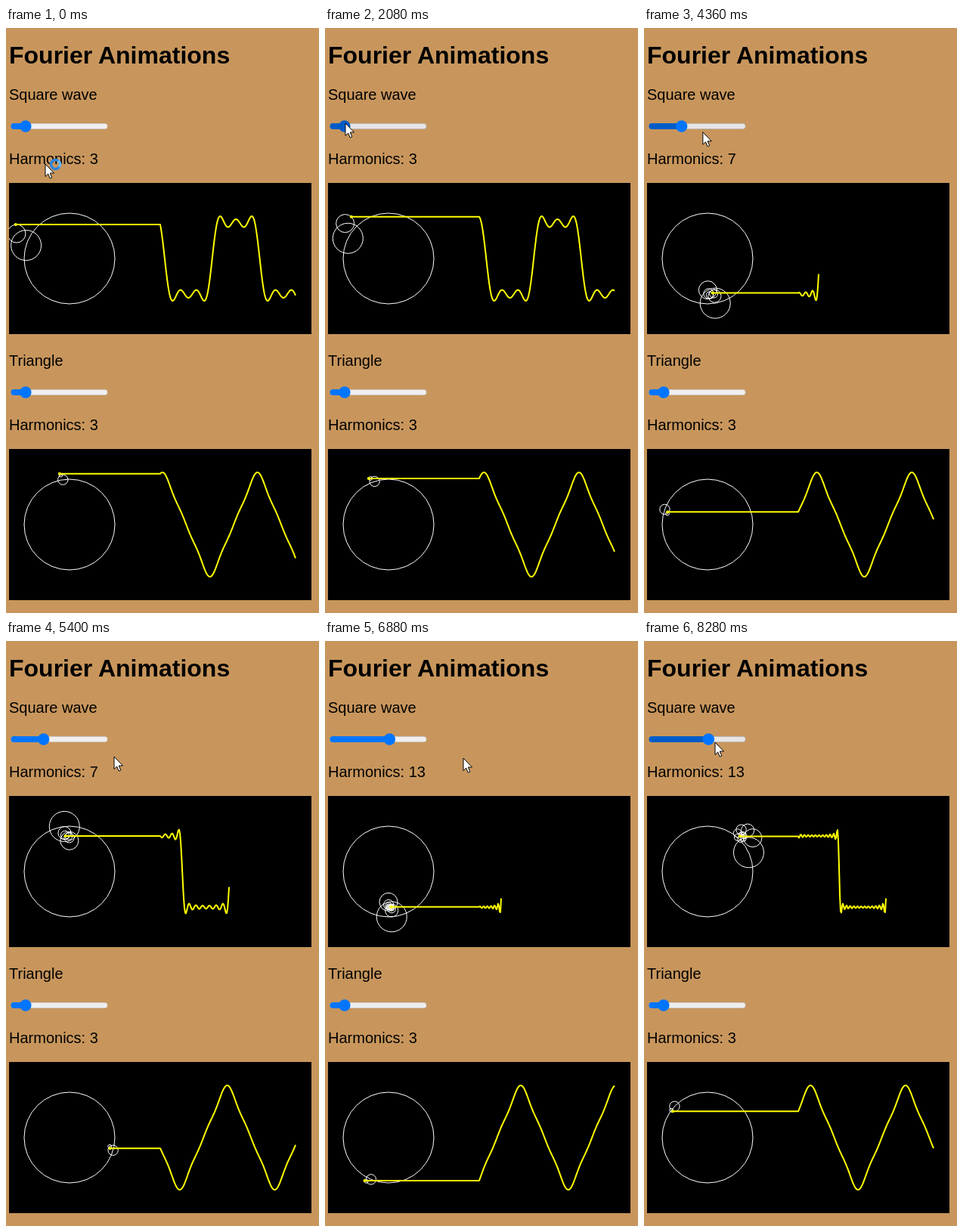
Write an HTML page with a canvas that moves like this. It is 414x774 px and loops after 8.32 s.

```html
<!DOCTYPE html>
<html lang="en">
<head>
<meta charset="utf-8">
<title>Fourier Animations</title>
<style>
  html, body { margin: 0; width: 100%; height: 100%; overflow: hidden; background: #c8965c; }
  svg, canvas { position: absolute; left: 0; top: 0; width: 414px; height: 774px; }
  text { font: 20px Arial, "Liberation Sans", sans-serif; fill: #000; }
  text.title { font-size: 32px; font-weight: bold; }
</style>
</head>
<body>
<svg viewBox="0 0 414 774">
  <text class="title" x="4" y="47">Fourier Animations</text>
  <text x="4" y="95">Square wave</text>
  <text x="4" y="180" id="count">Harmonics: 3</text>
  <text x="4" y="447">Triangle</text>
  <text x="4" y="532">Harmonics: 3</text>
</svg>
<canvas id="stage" width="414" height="774"></canvas>
<script>
const ctx = document.getElementById('stage').getContext('2d');
const count = document.getElementById('count');
const LOOP = 8320, TICK = 40, STEP = 0.05, TRACE = 180;

// Time in ms -> simulation steps done
const steps = [[0, 0], [1000, 62], [2080, 129], [3320, 208], [5400, 337], [6880, 429], [8320, 518.5]];

// Pointer keys: time, x, y
const pointerA = [[0, 52, 180], [240, 52, 180], [580, 66, 52]];
const pointerB = [
  [1720, 0, 96], [1980, 27, 126], [2400, 27, 126], [2700, 25, 128], [3520, 25, 128],
  [3917, 49, 131], [4150, 49, 131], [4720, 143, 153], [5480, 143, 153], [5880, 50, 132],
  [5960, 50, 132], [6397, 85, 133], [6500, 85, 133], [6820, 183, 155], [7600, 183, 155],
  [8200, 94, 134], [8320, 94, 134]
];

function lerpKeys(keys, t, ease) {
  let i = 0;
  while (i < keys.length - 2 && t >= keys[i + 1][0]) i++;
  const a = keys[i], b = keys[i + 1];
  let f = Math.min(1, Math.max(0, (t - a[0]) / (b[0] - a[0])));
  if (ease) f = f * f * (3 - 2 * f);
  return a.slice(1).map((v, k) => v + (b[k + 1] - v) * f);
}

// Value of the upper slider and the step at which it last changed
function sliderState(n) {
  let value = 3, since = null;
  for (let v = 4; v <= 13; v++) {
    const at = v <= 7 ? 245 - 7 * (7 - v) : 399 - 5 * (13 - v);
    if (n >= at) { value = v; since = at; }
  }
  return { value, since };
}

function squareTerm(k, a) {
  const m = 2 * k + 1, r = 60 / m;
  return { r, x: r * Math.cos(m * a), y: r * Math.sin(m * a) };
}

function triangleTerm(k, a) {
  const m = 2 * k + 1, r = 60 / (m * m);
  return { r, x: r * Math.sin(m * a), y: r * Math.cos(m * a) };
}

function circle(x, y, r) {
  ctx.beginPath();
  ctx.arc(x, y, r, 0, Math.PI * 2);
}

function drawWave(top, term, harmonics, angle, length) {
  ctx.save();
  ctx.fillStyle = '#000';
  ctx.fillRect(4, top, 400, 200);
  ctx.beginPath();
  ctx.rect(4, top, 400, 200);
  ctx.clip();

  let x = 84, y = top + 100;
  ctx.strokeStyle = '#fff';
  ctx.lineWidth = 1;
  for (let k = 0; k < harmonics; k++) {
    const c = term(k, angle);
    circle(x, y, c.r);
    ctx.stroke();
    x += c.x;
    y += c.y;
  }

  ctx.fillStyle = ctx.strokeStyle = '#ff0';
  circle(x, y, 2);
  ctx.fill();
  ctx.lineWidth = 2;
  ctx.lineJoin = 'round';
  ctx.beginPath();
  ctx.moveTo(x, y);
  for (let i = 0; i < length; i++) {
    let v = top + 100;
    for (let k = 0; k < harmonics; k++) v += term(k, angle - STEP * i).y;
    ctx.lineTo(204 + i, v);
  }
  ctx.stroke();
  ctx.restore();
}

function bar(x, y, w, h, r, color) {
  ctx.fillStyle = color;
  ctx.beginPath();
  ctx.roundRect(x, y, w, h, r);
  ctx.fill();
}

function drawSlider(y, value, mouse, pressed) {
  const x = 14 + (value - 1) * 113 / 19;
  const over = mouse && mouse[0] >= 6 && mouse[0] <= 135 && Math.abs(mouse[1] - y) <= 8;
  const onThumb = over && Math.hypot(mouse[0] - x, mouse[1] - y) <= 8;
  const blue = on => pressed ? '#3793ff' : on ? '#005cc8' : '#0075ff';
  bar(6.5, y - 4, 128, 8, 4, over && !pressed ? '#b2a89e' : '#c3b8ae');
  bar(7.2, y - 3.2, 126.6, 6.4, 3.2, pressed ? '#f5f5f5' : over ? '#e5e5e5' : '#efefef');
  bar(6.5, y - 4, x - 6.5, 8, [4, 0, 0, 4], blue(over));
  ctx.fillStyle = blue(onThumb);
  circle(x, y, 7.7);
  ctx.fill();
}

function drawPointer([x, y]) {
  const shape = [[0, 0], [0, 16.5], [3.7, 13], [6.2, 19], [8.8, 17.9], [6.3, 12], [11.5, 12]];
  ctx.beginPath();
  shape.forEach(([dx, dy]) => ctx.lineTo(x + dx, y + dy));
  ctx.closePath();
  ctx.fillStyle = '#fff';
  ctx.fill();
  ctx.strokeStyle = '#000';
  ctx.lineWidth = 1;
  ctx.stroke();
}

function drawBusyRing(x, y, t) {
  ctx.lineWidth = 3.5;
  ctx.strokeStyle = '#2f86dc';
  circle(x, y, 6);
  ctx.stroke();
  ctx.strokeStyle = '#69b8f2';
  ctx.beginPath();
  ctx.arc(x, y, 6, t / 150 - 1, t / 150 + 0.6);
  ctx.stroke();
}

function draw(t) {
  const n = Math.round(lerpKeys(steps, t)[0]);
  const { value, since } = sliderState(n);
  const fresh = since !== null;
  const run = fresh ? n - since : 0;
  const mouse = t < 580 ? lerpKeys(pointerA, t, true) : t >= 1720 ? lerpKeys(pointerB, t, true) : null;
  const pressed = (t >= 3000 && t < 4150) || (t >= 5940 && t < 6500);

  ctx.clearRect(0, 0, 414, 774);
  drawWave(205, squareTerm, value, fresh ? STEP * run : 3.437 + STEP * n,
    fresh ? Math.min(TRACE, run) : TRACE);
  drawWave(557, triangleTerm, 3, 3.287 + STEP * n, TRACE);
  drawSlider(130, value, mouse, pressed);
  drawSlider(482, 3, null, false);

  const label = 'Harmonics: ' + value;
  if (count.textContent !== label) count.textContent = label;

  if (mouse) {
    drawPointer(mouse);
    if (t < 400) drawBusyRing(mouse[0] + 13.5, mouse[1] + 0.5, t);
  }
}

const begin = performance.now();
function loop() {
  const t = (performance.now() - begin) % LOOP;
  draw(Math.floor(t / TICK) * TICK);
  requestAnimationFrame(loop);
}
loop();
</script>
</body>
</html>
```
